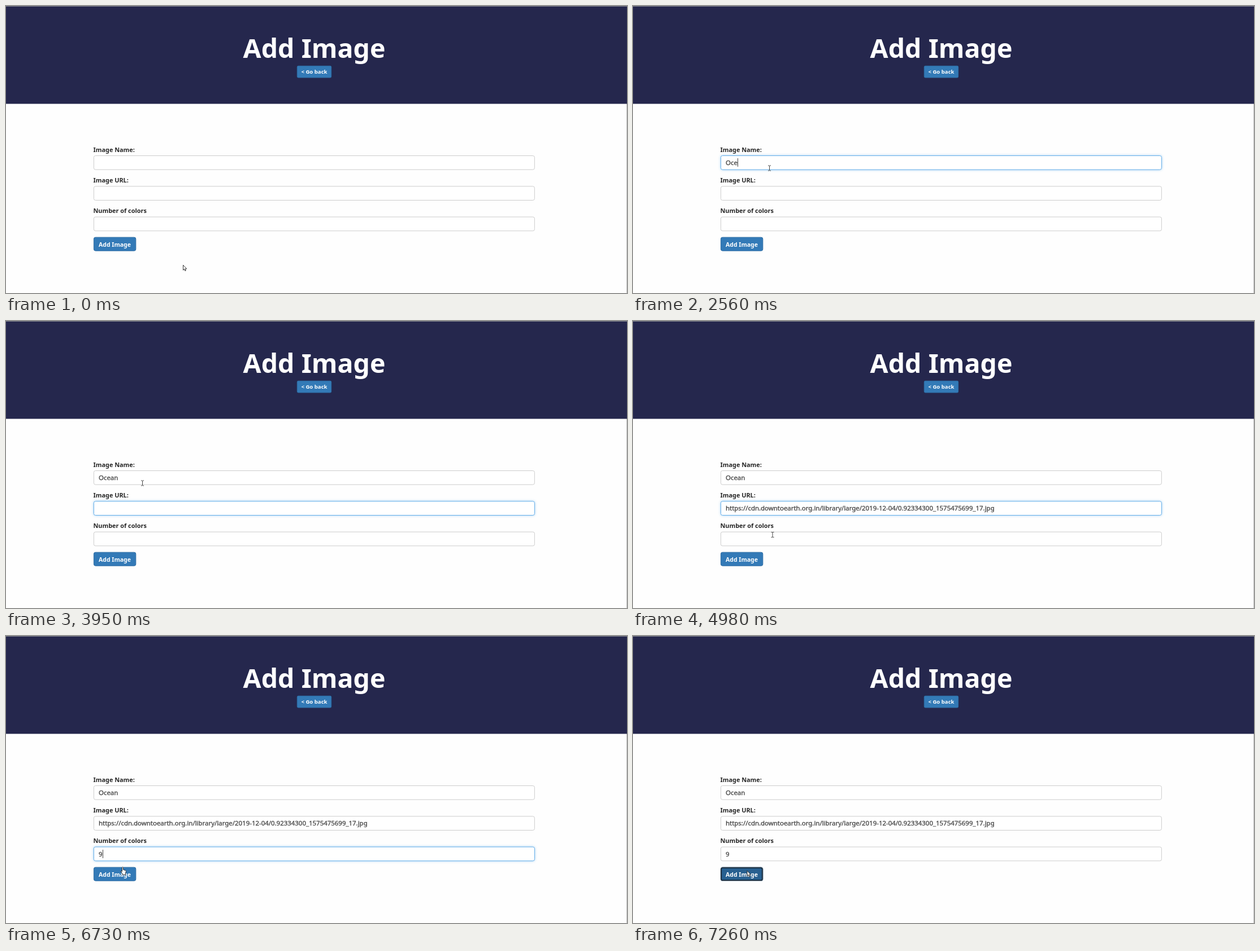
Recreate the animation shown at these times as an HTML page. Size 1099x509 px, loop 8000 ms.

```html
<!DOCTYPE html>
<html lang="en">
<head>
<meta charset="utf-8">
<title>Add Image</title>
<style>
  html, body { margin: 0; width: 100%; height: 100%; overflow: hidden; background: #fefefe; }
  svg { display: block; width: 1099px; height: 509px; }
  text { font-family: "Noto Sans", "Open Sans", sans-serif; font-weight: 700; fill: #262626; white-space: pre; }
  .light { fill: #fff; }
  .value { font-size: 11.45px; font-weight: 400; fill: #4a4a4a; stroke: #4a4a4a; stroke-width: .35px; }
  .button { fill: #337ab7; stroke: #2e6da4; }
  .pointer { fill: #fff; stroke: #222; stroke-width: .9; stroke-linejoin: round; }
</style>
</head>
<body>
<svg viewBox="0 0 1099 509">
  <rect width="1099" height="509" fill="#fefefe"/>
  <rect x="1098" width="1" height="509" fill="#bdbdbd"/>
  <rect width="1099" height="173.5" fill="#25274d"/>
  <rect width="1099" height="1" fill="#85868f"/>
  <text class="light" x="545.5" y="92" font-size="46.5" text-anchor="middle">Add Image</text>
  <rect class="button" x="515.3" y="106.3" width="60.4" height="20.7" rx="2"/>
  <text class="light" x="545.5" y="120" font-size="9.6" text-anchor="middle">&lt; Go back</text>
  <g id="fields"></g>
  <rect id="add" class="button" x="155.4" y="410.2" width="74.4" height="24" rx="3"/>
  <g id="focusRing" fill="none">
    <rect x="155" y="410" width="75" height="24.5" rx="3" stroke="#a3b4c2"/>
    <rect x="156.3" y="411.2" width="72.4" height="22" rx="2" stroke="#15202b" stroke-width="1.5"/>
  </g>
  <text class="light" x="192.5" y="427" font-size="10.5" text-anchor="middle">Add Image</text>
  <rect id="caret" width="1" height="15" fill="#444"/>
  <g id="cursor">
    <path id="arrow" class="pointer" d="M.5 .5V9.4L2.5 7.6 3.9 10.8 5.3 10.2 3.9 7.1H6.8Z"/>
    <path id="beam" fill="none" stroke="#444" d="M-2.5-4.5H-.8L0-4 .8-4.5H2.5M0-4V4M-2.5 4.5H-.8L0 4 .8 4.5H2.5"/>
    <path id="hand" class="pointer" d="M-1 8V1Q0-.6 1 1V5L5 6.2Q6 6.6 5.8 8L5 11.5V14H-.2V12L-3.4 8.4Q-3.4 6.6-1 8Z"/>
  </g>
</svg>
<script>
const LOOP = 8000;
const FIELD_HEIGHT = 24.7;
const $ = id => document.getElementById(id);
const URL_TEXT = "https://cdn.downtoearth.org.in/library/large/2019-12-04/0.92334300_1575475699_17.jpg";

// typed: moments at which the value grows, one character each unless pasted
const fields = [
  { label: "Image Name:", value: "Ocean", focus: 1220, blur: 3450, caretFrom: 1150,
    typed: [2050, 2380, 2560, 3000, 3220] },
  { label: "Image URL:", value: URL_TEXT, focus: 3450, blur: 5300, caretFrom: 3450,
    typed: [4480], pasted: true },
  { label: "Number of colors", value: "9", focus: 5300, blur: 7140, caretFrom: 5300,
    typed: [6300] }
];

// time, x, y of the pointer's hot spot
const path = [
  [320, 313, 459], [890, 238, 284], [1200, 238, 284], [1390, 241.5, 287.5],
  [4590, 241.5, 287.5], [4980, 247, 379], [5100, 247, 387],
  [6400, 247, 387], [6730, 206.5, 409.5], [6930, 201.5, 416]
];

const clamp = v => Math.max(0, Math.min(1, v));
const smooth = v => v * v * (3 - 2 * v);
const ramp = (t, start) => smooth(clamp((t - start) / 120));
const mix = (a, b, k) => a + (b - a) * k;

function add(tag, attributes, content = "") {
  const node = document.createElementNS("http://www.w3.org/2000/svg", tag);
  for (const name in attributes) node.setAttribute(name, attributes[name]);
  node.textContent = content;
  return $("fields").appendChild(node);
}

fields.forEach((f, i) => {
  f.y = 265.5 + i * 54.3;
  add("text", { x: 154.5, y: f.y - 7, "font-size": 10.9 }, f.label);
  f.box = add("rect", { x: 155.4, y: f.y, width: 780, height: FIELD_HEIGHT, rx: 3, fill: "#fff" });
  f.text = add("text", { class: "value", x: 164, y: f.y + 16.4 });
});

function pointerAt(t) {
  const next = path.findIndex(p => p[0] > t);
  if (next === 0) return path[0].slice(1);
  if (next < 0) return path[path.length - 1].slice(1);
  const a = path[next - 1], b = path[next];
  const k = smooth((t - a[0]) / (b[0] - a[0]));
  return [mix(a[1], b[1], k), mix(a[2], b[2], k)];
}

function drawFields(t) {
  let caretShown = false;
  for (const f of fields) {
    const glow = ramp(t, f.focus) - ramp(t, f.blur);
    const border = [[204, 102], [204, 175], [204, 233]].map(([a, b]) => Math.round(mix(a, b, glow)));
    f.box.setAttribute("stroke", `rgb(${border})`);
    f.box.style.filter = glow > 0 ? `drop-shadow(0 0 2px rgba(102,175,233,${glow * .6}))` : "none";

    const presses = f.typed.filter(at => at <= t);
    f.text.textContent = f.value.slice(0, f.pasted && presses.length ? undefined : presses.length);

    if (t >= f.focus && t < f.blur) {
      const since = t - (presses.length ? presses[presses.length - 1] : f.caretFrom);
      caretShown = since % 1000 < 500;
      const width = f.text.textContent ? f.text.getComputedTextLength() : 0;
      $("caret").setAttribute("x", Math.round(164 + width));
      $("caret").setAttribute("y", Math.round(f.y + 4.5));
    }
  }
  show("caret", caretShown);
}

function show(id, visible) {
  $(id).style.display = visible ? "" : "none";
}

function drawPointer(t) {
  const [x, y] = pointerAt(t);
  const overField = fields.some(f => y >= f.y && y <= f.y + FIELD_HEIGHT);
  const overButton = y >= 409 && y <= 435 && x >= 155 && x <= 230;
  const pressed = t >= 7140;
  const kind = overField ? "beam" : overButton && t < 7230 ? "hand" : "arrow";
  for (const id of ["arrow", "beam", "hand"]) show(id, id === kind);
  $("cursor").setAttribute("transform", `translate(${x} ${y})`);

  const dark = pressed || (overButton && t >= 6760);
  $("add").style.fill = dark ? "#286090" : "#337ab7";
  $("add").style.stroke = dark ? "#204d74" : "#2e6da4";
  show("focusRing", pressed);
}

function frame() {
  const t = performance.now() % LOOP;
  drawFields(t);
  drawPointer(t);
  requestAnimationFrame(frame);
}
frame();
</script>
</body>
</html>
```
